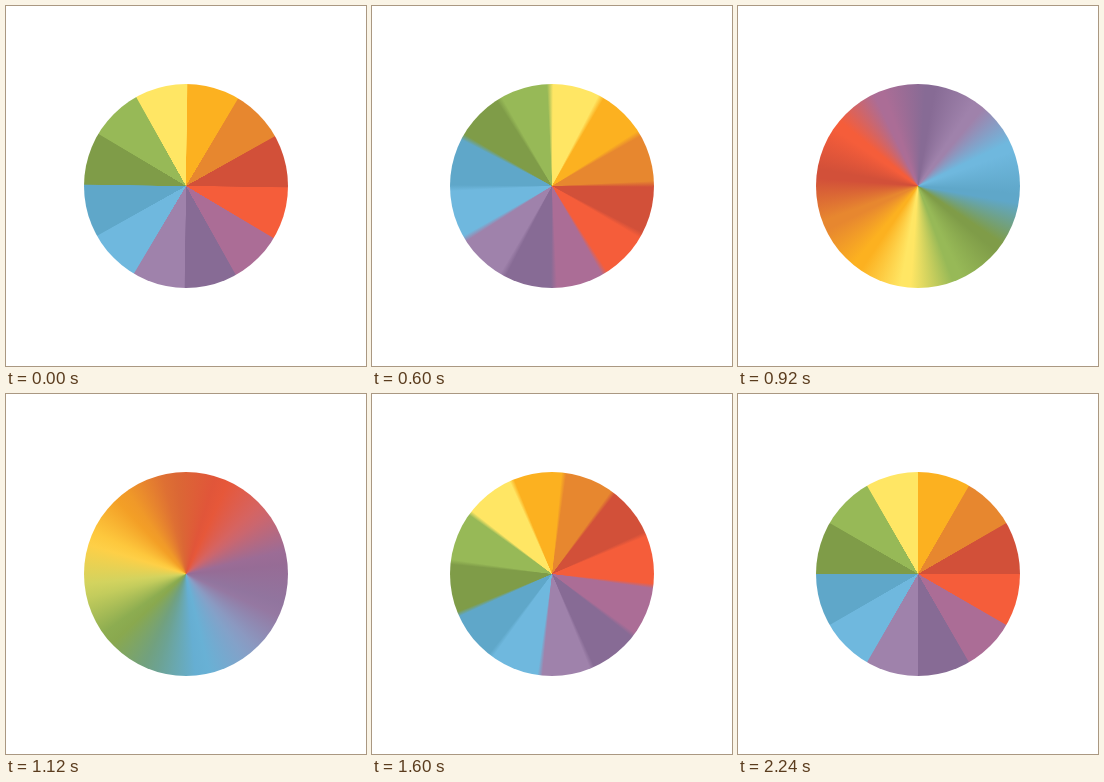
These frames come from a looping animation (360x360 px, 2320 ms). An HTML page:

```html
<!DOCTYPE html>
<html lang="en">
<head>
<meta charset="utf-8">
<title>Colour wheel</title>
<style>
  html, body { margin: 0; width: 100%; height: 100%; overflow: hidden; background: #fff; }
  #wheel {
    position: absolute; left: 78px; top: 78px;
    width: 204px; height: 204px; border-radius: 50%;
  }
</style>
</head>
<body>
<div id="wheel"></div>
<script>
  // Slices clockwise from twelve o'clock.
  const slices = [
    '#fcb120', '#e7872f', '#d25039', '#f55d3a', '#ab6d96', '#876b95',
    '#9f82ab', '#6fb8de', '#5fa7c9', '#7f9c48', '#97b957', '#ffe664'
  ].map(hex => [1, 3, 5].map(k => parseInt(hex.slice(k, k + 2), 16)));

  const LOOP = 2320, STEP = 40, LAST = 56;
  const SPAN = 57;          // steps in the whole spin
  const TURN = 1080;        // three full turns
  const SHUTTER = 0.5;      // share of a step that is exposed
  const PHASE = 1.45;       // middle of the exposure, in steps
  const ARC = 360 / slices.length;
  const wheel = document.getElementById('wheel');

  const easeInOutExpo = p =>
    p >= 1 ? 1 : p < 0.5 ? 2 ** (20 * p - 11) : 1 - 2 ** (9 - 20 * p);
  const angleAt = step => TURN * easeInOutExpo(step / SPAN);
  const mod = a => ((a % 360) + 360) % 360;

  // Running total of colour up to each slice edge.
  const sums = [[0, 0, 0]];
  slices.forEach((c, k) => sums.push(c.map((v, j) => sums[k][j] + v * ARC)));
  const total = sums[slices.length];

  function integral(a) {
    const turns = Math.floor(a / 360);
    const rest = a - turns * 360;
    const k = Math.min(Math.floor(rest / ARC), slices.length - 1);
    return slices[k].map((v, j) => turns * total[j] + sums[k][j] + v * (rest - k * ARC));
  }

  // Rotational blur is linear between slice edges, so a few stops are exact.
  function paint(step) {
    let from = angleAt(step + PHASE - SHUTTER / 2);
    let to = angleAt(step + PHASE + SHUTTER / 2);
    if (to - from < 0.5) {
      const mid = (from + to) / 2;
      from = mid - 0.25;
      to = mid + 0.25;
    }
    const angles = [0, 360];
    for (let k = 0; k < slices.length; k++) {
      angles.push(mod(k * ARC + from), mod(k * ARC + to));
    }
    const stops = angles.sort((a, b) => a - b).map(a => {
      const high = integral(a - from), low = integral(a - to);
      const rgb = high.map((v, j) => ((v - low[j]) / (to - from)).toFixed(1));
      return `rgb(${rgb.join(',')}) ${a.toFixed(3)}deg`;
    });
    wheel.style.background = `conic-gradient(${stops.join(',')})`;
  }

  const start = performance.now();
  let shown = -1;
  function tick() {
    const t = Math.max(0, performance.now() - start) % LOOP;
    const step = Math.min(Math.floor(t / STEP), LAST);
    if (step !== shown) paint(shown = step);
    requestAnimationFrame(tick);
  }
  tick();
</script>
</body>
</html>
```
